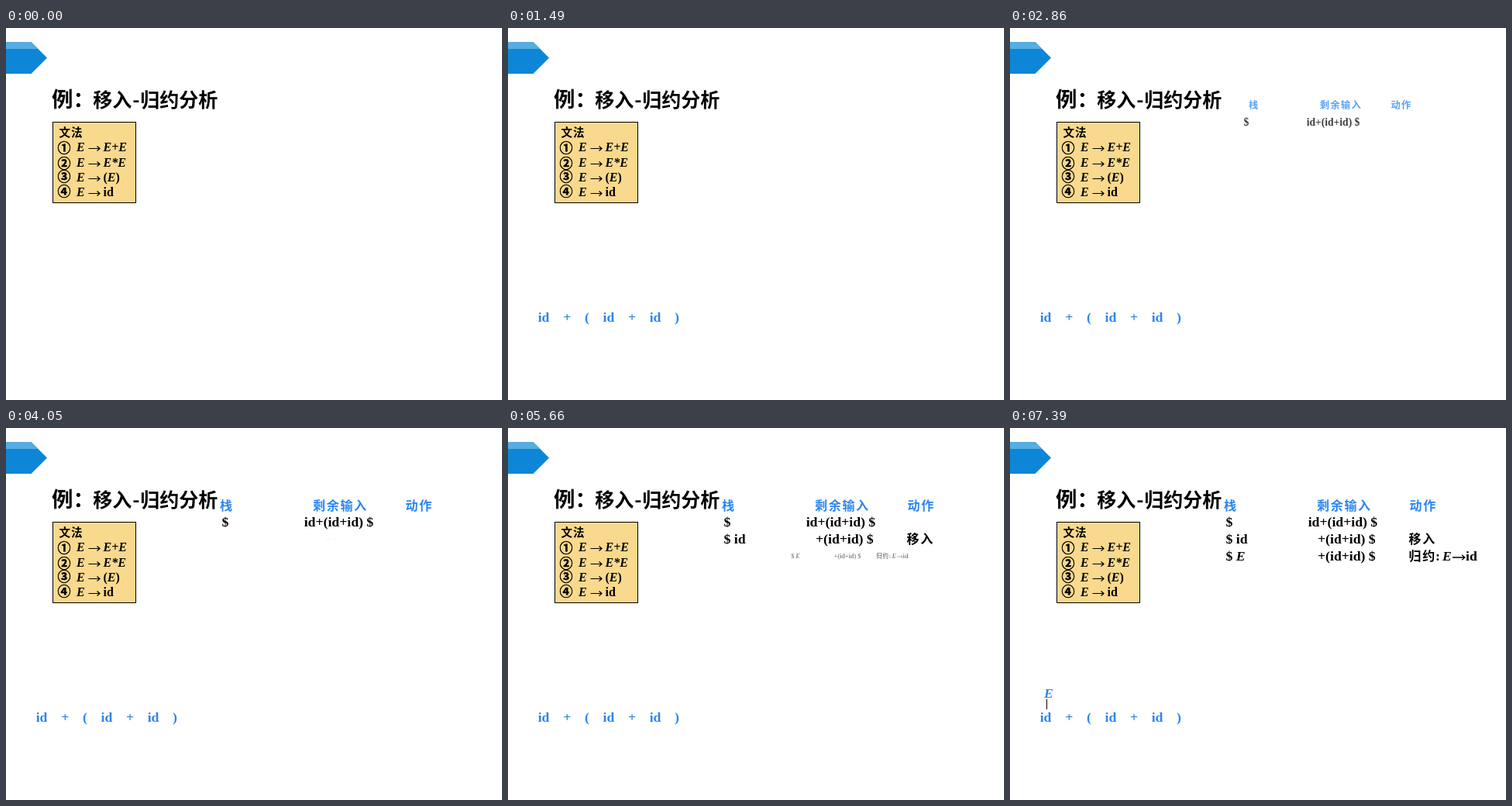
Animation of 640 by 480 pixels, one loop 8000 ms. Source, as an HTML page:

```html
<!DOCTYPE html>
<html lang="zh-CN">
<head>
<meta charset="utf-8">
<title>移入-归约分析</title>
<style>
  @property --p { syntax: "<number>"; inherits: false; initial-value: 0; }

  html, body { margin: 0; width: 100%; height: 100%; overflow: hidden; background: #fff; }
  svg { display: block; width: 100%; height: 100%; }

  text { white-space: pre; font: bold 17.7px "Liberation Serif", "Noto Sans CJK SC", serif; }
  .title { font: bold 25px "Noto Sans CJK SC", sans-serif; }
  .brush { font: bold 16px "Noto Sans CJK SC", sans-serif; letter-spacing: 1.7px; }
  .blue { fill: #2b85ee; }
  .rules text { font-size: 16px; }
  .rules .brush { font-size: 14.5px; letter-spacing: 1px; }
  .rules .num { font: bold 17px "Noto Sans CJK SC", sans-serif; stroke: #000; stroke-width: .5px; }
  .it { font-style: italic; }

  /* Faded zoom: --p drives both size and opacity */
  .zoom {
    opacity: var(--p);
    scale: min(1, var(--p));
    animation: 8s infinite step-end;
  }
  #input  { transform-origin: 130px 373px; animation-name: input; }
  #head   { transform-origin: 412.5px 100px; animation-name: table; }
  #start  { transform-origin: 376.5px 121px; animation-name: table; }
  #shift  { transform-origin: 414px 143px; animation-name: shift; }
  #reduce { transform-origin: 441px 165px; animation-name: reduce; }
  #tree   { transform-origin: 48px 350px; animation-name: tree; }

  @keyframes input {
    0% { --p: 0; }
    13.375% { --p: .1; animation-timing-function: steps(7); }
    18.625%, 100% { --p: 1.033; }
  }
  @keyframes table {
    0% { --p: 0; }
    32% { --p: .1; animation-timing-function: steps(7); }
    37.25%, 100% { --p: 1.033; }
  }
  @keyframes shift {
    0% { --p: 0; }
    50.625% { --p: .1; animation-timing-function: steps(7); }
    55.875%, 100% { --p: 1.033; }
  }
  @keyframes reduce {
    0% { --p: 0; }
    69.25% { --p: .2; animation-timing-function: steps(6); }
    73.75%, 100% { --p: 1; }
  }
  @keyframes tree {
    0% { --p: 0; }
    87.125% { --p: .1; animation-timing-function: steps(7); }
    92.375%, 100% { --p: 1.033; }
  }
</style>
</head>
<body>
<svg viewBox="0 0 640 480">
  <defs>
    <path id="arrow" d="M0 0H14.5M11 -3L14.5 0L11 3" fill="none" stroke="#000" stroke-width="1.2"/>
  </defs>

  <path d="M0 18H32.5L53 38.5L32.5 59H0Z" fill="#0d86d8"/>
  <path d="M0 18H32.5L41.5 27H0Z" fill="#56ade2"/>

  <text class="title" y="101.5"><tspan x="59" font-size="27.5" style="font-size:27.5px">例：</tspan><tspan x="112.3">移入</tspan><tspan x="163.3">-</tspan><tspan x="173.3">归约分析</tspan></text>

  <g class="rules">
    <rect x="60.5" y="121.5" width="107" height="104" fill="#f9d98d" stroke="#000"/>
    <text class="brush" x="68.5" y="140">文法</text>
    <text class="num" x="66.5" y="160.5">①</text>
    <text class="num" x="66.5" y="180.5">②</text>
    <text class="num" x="66.5" y="197.5">③</text>
    <text class="num" x="66.5" y="216.5">④</text>
    <text class="it" y="159"><tspan x="91">E</tspan><tspan x="125.5">E+E</tspan></text>
    <text class="it" y="179"><tspan x="91">E</tspan><tspan x="125.5">E*E</tspan></text>
    <text y="198"><tspan x="91" class="it">E</tspan><tspan x="125.5">(<tspan class="it">E</tspan>)</tspan></text>
    <text y="217"><tspan x="91" class="it">E</tspan><tspan x="125.5">id</tspan></text>
    <use href="#arrow" x="106.5" y="155.5"/>
    <use href="#arrow" x="106.5" y="175.5"/>
    <use href="#arrow" x="106.5" y="194.5"/>
    <use href="#arrow" x="106.5" y="213.5"/>
  </g>

  <g id="input" class="zoom">
    <text class="blue" x="38.7" y="379">id    +    (    id    +    id    )</text>
  </g>

  <g id="head" class="zoom">
    <text class="brush blue" y="105.5"><tspan x="276">栈</tspan><tspan x="396">剩余输入</tspan><tspan x="515.5">动作</tspan></text>
  </g>
  <g id="start" class="zoom">
    <text y="127"><tspan x="278.5">$</tspan><tspan x="384.7">id+(id+id) $</tspan></text>
  </g>
  <g id="shift" class="zoom">
    <text y="149"><tspan x="278.5">$ id</tspan><tspan x="397">+(id+id) $</tspan><tspan x="514.5" class="brush">移入</tspan></text>
  </g>
  <g id="reduce" class="zoom">
    <text y="171"><tspan x="278.5">$ <tspan class="it">E</tspan></tspan><tspan x="397">+(id+id) $</tspan><tspan x="514.5" class="brush">归约</tspan><tspan x="549">:</tspan><tspan x="558" class="it">E</tspan><tspan x="588">id</tspan></text>
    <use href="#arrow" transform="translate(571 167) scale(1.1)"/>
  </g>

  <g id="tree" class="zoom">
    <text class="blue it" x="44" y="348">E</text>
    <path d="M47.5 350V363" stroke="#000"/>
  </g>
</svg>
</body>
</html>
```
